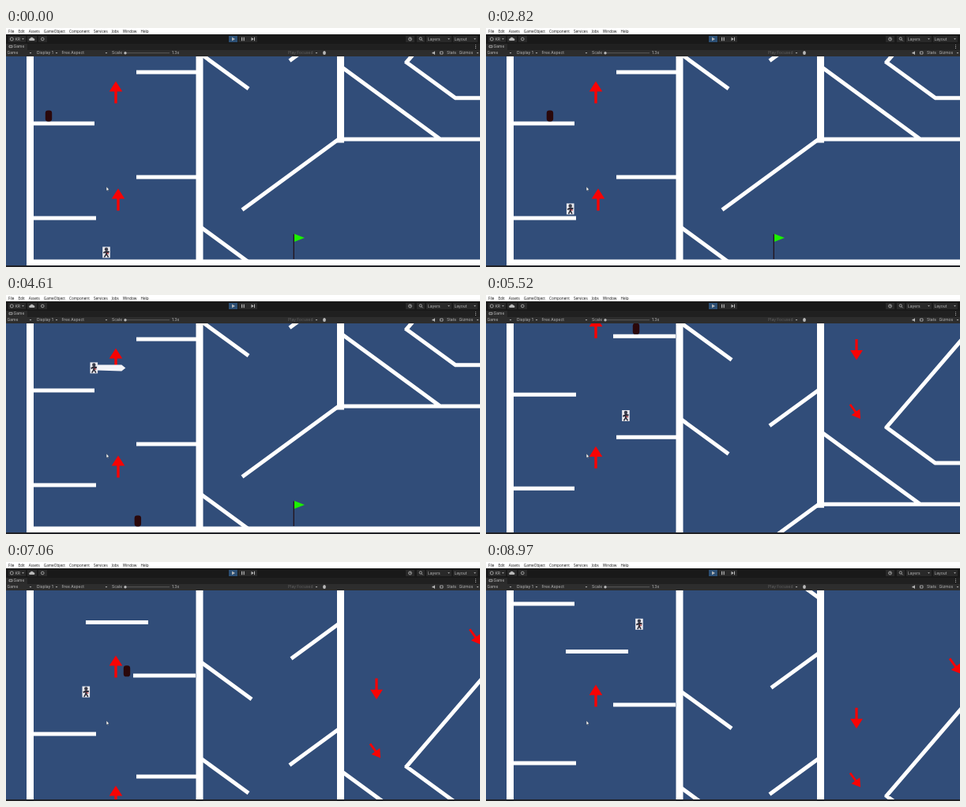
An HTML page that plays this animation: 600 by 303 pixels, repeating every 9.03 s.

```html
<!DOCTYPE html>
<html lang="en">
<head>
<meta charset="utf-8">
<title>Platformer in the editor</title>
<style>
  html, body { margin: 0; width: 100%; height: 100%; overflow: hidden; background: #191919; }
  svg { display: block; width: 600px; height: 303px; }
  text { font: 5px Inter, Roboto, sans-serif; fill: #b8b8b8; }
  #menu { font: 4.7px "Open Sans", "Noto Sans", sans-serif; fill: #111; }
  .dim { fill: #626262; }
  .icon { fill: none; stroke: #b8b8b8; stroke-width: .8; }
  .solid { fill: #b8b8b8; }
</style>
</head>
<body>
<svg viewBox="0 0 600 303">
  <defs>
    <path id="arrow" d="M0-14 8.3-.8H1.7V14H-1.7V-.8H-8.3Z" fill="#f80303"/>
    <rect id="capsule" x="-4.2" y="-7" width="8.4" height="14" rx="3.4" fill="#2a080b"/>
    <path id="caret" d="M-1.4-.8H1.4L0 .8Z" class="solid"/>
  </defs>
  <rect width="600" height="303" fill="#314d79"/>

  <g id="world">
    <path d="M26-300h9V293H600v8H26ZM240.5-300h9V294h-9ZM419-300h9V145h-9Z" fill="#fff"/>
    <path id="bars" fill="none" stroke="#fff" stroke-width="5"/>
    <use href="#arrow" x="139" y="81"/>
    <use href="#arrow" x="142" y="217"/>
    <use href="#arrow" x="139" y="-84"/>
    <use href="#arrow" transform="translate(469 -55.5) rotate(180) scale(.95)"/>
    <use href="#arrow" transform="translate(467.5 23) rotate(144) scale(.8)"/>
    <use href="#arrow" transform="translate(594 -121.5) rotate(144) scale(.85)"/>
    <path d="M364.3 261V292.5" stroke="#24141c" stroke-width="1.3"/>
    <path d="M365 260.5 378 265.6 365 270.6Z" fill="#1cf000"/>
    <use id="roller1" href="#capsule"/>
    <use id="roller2" href="#capsule"/>
    <g id="player">
      <path id="sword" d="M4-4 35-4 40 0 35 4 4 3Z" fill="#f4f4f8"/>
      <rect x="-4.8" y="-7" width="9.6" height="14" fill="#e9e9ee"/>
      <circle cy="-4" r="2.2" fill="#3a3d4c"/>
      <path d="M-3.6.8 0-1.2 3.6-.4M0-2V2.6" fill="none" stroke="#2b2c3a" stroke-width="2"/>
      <path d="M0 .6 3 2" stroke="#b0343c" stroke-width="1.2"/>
      <path id="legs" fill="none" stroke="#2b2c3a" stroke-width="1.6"/>
    </g>
  </g>

  <rect y="301" width="600" height="2" fill="#202126"/>
  <rect width="600" height="36" fill="#191919"/>
  <rect width="600" height="8" fill="#fff"/>
  <rect y="20" width="600" height="8" fill="#202020"/>
  <rect y="20" width="27" height="8" fill="#2b2b2b"/>
  <rect y="28" width="600" height="8" fill="#2d2d2d"/>
  <path d="M3 10h22v8H3ZM27 10h12v8H27ZM41 10h11v8H41ZM294 10h24v8h-24ZM506 10h11v8h-11ZM520 10h10v8h-10ZM532 10h32v8h-32ZM566 10h31v8h-31Z" fill="#292929"/>
  <path d="M282 10h11v8h-11Z" fill="#2c4f74"/>
  <path class="solid" d="M286 11.7 290 14 286 16.3ZM298 11.8h1.2v4.4H298ZM300.6 11.8h1.2v4.4h-1.2ZM310.5 11.8 313.6 14 310.5 16.2ZM314 11.8h1v4.4h-1Z"/>
  <path class="solid" d="M30 16a1.4 1.4 0 0 1 .5-2.7 2.3 2.3 0 0 1 4.4 0 1.4 1.4 0 0 1 .6 2.7Z"/>
  <g class="icon">
    <circle cx="7.3" cy="14" r="2"/>
    <circle cx="46.3" cy="14" r="1.8"/>
    <circle cx="511.5" cy="14" r="2"/>
    <circle cx="524.8" cy="13.5" r="1.6"/>
    <path d="M511.5 12.8V14h1.1M526 14.7l1.6 1.6M4 22.3h4v2.4H4ZM549.5 30h3.5v3h-3.5Z"/>
    <path d="M151 31.7h56" stroke="#666"/>
  </g>
  <g class="solid">
    <circle cx="151" cy="31.7" r="1.7"/>
    <ellipse cx="403" cy="31.5" rx="1.9" ry="2.5"/>
    <path d="M539.5 30.8H541l2-1.5V34l-2-1.5h-1.5Z"/>
    <path d="M594 21.2h.9v.9h-.9ZM594 23.1h.9v.9h-.9ZM594 25h.9v.9h-.9Z"/>
  </g>

  <text id="menu" x="3" y="5.8"></text>
  <text x="11.5" y="15.8">KR</text><use href="#caret" x="21.5" y="14"/>
  <text x="534" y="15.8">Layers</text><use href="#caret" x="560.5" y="14"/>
  <text x="567.5" y="15.8">Layout</text><use href="#caret" x="593.5" y="14"/>
  <text x="9.5" y="25.3">Game</text>
  <text x="1.5" y="33.4">Game</text><use href="#caret" x="31" y="31.7"/>
  <text x="39" y="33.4">Display 1</text><use href="#caret" x="64" y="31.7"/>
  <text x="70.5" y="33.4">Free Aspect</text><use href="#caret" x="127" y="31.7"/>
  <text x="134" y="33.4">Scale</text>
  <text x="210" y="33.4">1.3x</text>
  <text x="357" y="33.4" class="dim">Play Focused</text><use href="#caret" x="393" y="31.7"/>
  <text x="558" y="33.4">Stats</text>
  <text x="573.5" y="33.4">Gizmos</text><use href="#caret" x="597" y="31.7"/>
  <path d="M127.2 201.3v4.9l1.1-.9.7 1.5.7-.3-.7-1.5h1.4Z" fill="#fff" stroke="#222" stroke-width=".25"/>
</svg>
<script>
const LOOP = 9030, GRAVITY = 714, JUMP = 360, ROLL = 48;
const UNIT = 79, SLOPE = 36.2, FLOOR = 293, FEET = 9, RADIUS = 7;
const $ = id => document.getElementById(id);
const clamp = (v, a, b) => Math.min(b, Math.max(a, v));
const place = (id, x, y) => $(id).setAttribute('transform', `translate(${x} ${y})`);
const fall = s => GRAVITY / 2 * s * s;

$('menu').innerHTML = 'File Edit Assets GameObject Component Services Jobs Window Help'
  .split(' ').map((word, i) => `<tspan dx="${i ? 5 : 0}">${word}</tspan>`).join('');

// Every bar is a whole number of units long, laid from one end at an angle
const bar = (x, y, angle = 0, units = 1) => {
  const a = angle * Math.PI / 180, length = UNIT * units;
  return `M${x} ${y}l${length * Math.cos(a)} ${length * Math.sin(a)}`;
};

// Left end and top of each ledge, going up
const ledges = [[35, 238], [165, 186], [33, 118], [165, 53], [35, -1], [161, -75], [101, -142.5], [33, -203]];

$('bars').setAttribute('d', [
  ...ledges.map(([x, top]) => bar(x, top + 2.5)),
  bar(309, 297.8, SLOPE + 180), bar(307, 76.7, SLOPE + 180), bar(311, -42.5, SLOPE + 180),
  bar(359, 41, -SLOPE), bar(361, -94, -SLOPE), bar(360, -253, SLOPE),
  bar(299, 230, -SLOPE, 2), bar(549, 140, SLOPE + 180, 2),
  bar(505.5, 42, SLOPE), bar(506, 44, -49.4, 2),
  bar(428, 140.5, 0, 3), bar(568, 88.3)
].join(''));

// Launch time, launch x, landing x; each hop reaches the next ledge
const hops = [
  [1652, 146, 106], [2950, 107, 170], [3980, 168, 100], [4850, 104, 188],
  [5675, 190, 108], [6927, 87, 164], [8463, 212, 185]
];

function playerAt(t) {
  let landed = 0, x = 127, ground = FLOOR;
  for (const [i, [launch, from, to]] of hops.entries()) {
    if (t < launch) {
      return { x: x + (from - x) * (t - landed) / (launch - landed), y: ground - FEET, step: x !== from };
    }
    const top = ledges[i][1];
    const flight = (JUMP + Math.sqrt(JUMP ** 2 - 2 * GRAVITY * (ground - top))) / GRAVITY;
    const s = (t - launch) / 1000;
    if (s < flight) {
      return { x: from + (to - from) * s / flight, y: ground - FEET - JUMP * s + fall(s), step: true };
    }
    [landed, x, ground] = [launch + flight * 1000, to, top];
  }
  return { x, y: ground - FEET, step: false };
}

// Rolls from x to the edge of its ledge, then drops until it meets the floor
function roll(id, t, ledge, x, start, dir, edge) {
  const s = Math.max(0, (t - start) / 1000);
  const drop = fall(Math.max(0, s - Math.abs(edge - x) / ROLL));
  place(id, clamp(x + dir * ROLL * s, 40, 235), Math.min(FLOOR, ledges[ledge][1] + drop) - RADIUS);
}

function draw(now) {
  const t = now % LOOP;
  const camera = .4 + 216 * clamp((t - 4680) / 1460, 0, 1) + .144 * Math.max(0, t - 8713);
  place('world', 0, camera);
  const p = playerAt(t);
  place('player', p.x, p.y);
  const stride = p.step ? 2.6 * Math.cos(t / 70) : 1.8;
  $('legs').setAttribute('d', `M${-stride} 6.3 0 2 ${stride} 6.3`);
  $('sword').style.display = t >= 4490 && t < 4720 ? '' : 'none';
  roll('roller1', t, 2, 54, 2260, 1, 116);
  roll('roller2', t, 5, 190, 6290, -1, 158);
}

const begin = performance.now();
(function tick() {
  draw(performance.now() - begin);
  requestAnimationFrame(tick);
})();
</script>
</body>
</html>
```
